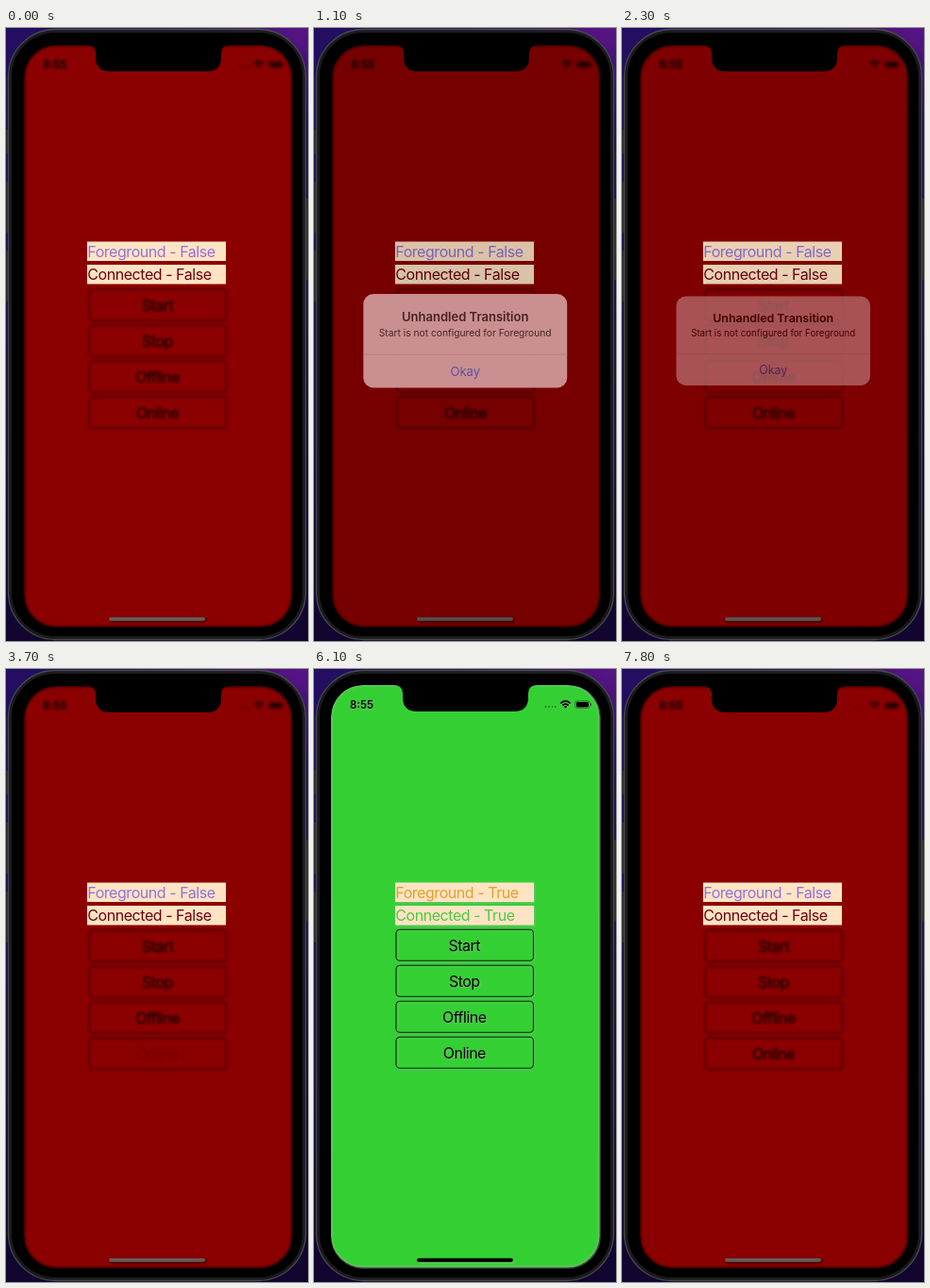
These frames come from a looping animation (320x650 px, 8000 ms). An HTML page:

```html
<!DOCTYPE html>
<html lang="en">
<head>
<meta charset="utf-8">
<title>Connection states</title>
<style>
  html, body { margin: 0; width: 100%; height: 100%; overflow: hidden; background: #12052f; }
  svg { display: block; width: 100vw; height: 100vh; }
  text { font-family: Inter, Roboto, sans-serif; }
  .label { font-size: 16px; letter-spacing: -.45px; }
  .button text { font-size: 16px; letter-spacing: -.5px; text-anchor: middle; }
  .button rect { fill: none; stroke: #000; stroke-width: 1.1; stroke-opacity: .85; }
  .soft text { stroke: #000; stroke-width: .5; }
  .soft .button rect { stroke-width: 2; stroke-opacity: .5; }
  #alert text { text-anchor: middle; }
</style>
</head>
<body>
<svg viewBox="0 0 320 650" preserveAspectRatio="none">
  <defs>
    <linearGradient id="wall" x2="0" y2="1">
      <stop offset="0" stop-color="#240e62"/>
      <stop offset=".4" stop-color="#191050"/>
      <stop offset="1" stop-color="#12052f"/>
    </linearGradient>
    <radialGradient id="bloom" cx="1" cy="0" r=".6">
      <stop offset="0" stop-color="#5a1486"/>
      <stop offset="1" stop-color="#5a1486" stop-opacity="0"/>
    </radialGradient>
    <clipPath id="glass"><rect x="18" y="17" width="286" height="619" rx="34"/></clipPath>
  </defs>

  <rect width="320" height="650" fill="url(#wall)"/>
  <rect width="320" height="160" fill="url(#bloom)"/>

  <g fill="#2c2c31">
    <rect y="108" width="3" height="25"/>
    <rect y="163" width="3" height="54"/>
    <rect y="236" width="3" height="54"/>
    <rect x="317" y="181" width="3" height="86"/>
  </g>
  <rect x="2.5" y="1.5" width="315" height="647" rx="50" fill="#1b1b1d" stroke="#48494d" stroke-width="1.3"/>
  <rect x="6" y="5" width="308" height="640" rx="46" fill="#000"/>

  <g clip-path="url(#glass)">
    <g id="panel">
      <rect id="screen" x="18" y="17" width="284.5" height="617.5" rx="34"/>
      <rect id="edge" x="18" y="17" width="284.5" height="617.5" rx="34" fill="none" stroke-width="2.6" style="filter:blur(1px)"/>
      <path d="M84 15H237V17Q227 17 227 26V30Q227 45 212 45H109Q94 45 94 30V26Q94 17 84 17Z"/>
    </g>

    <g id="status">
      <text x="38" y="41.8" font-size="11.5" font-weight="600">8:55</text>
      <g id="dots" opacity=".4">
        <circle cx="245.5" cy="40" r=".9"/><circle cx="249" cy="40" r=".9"/>
        <circle cx="252.5" cy="40" r=".9"/><circle cx="256" cy="40" r=".9"/>
      </g>
      <path d="M261.3 36.3Q266.5 31.7 271.7 36.3M263.3 38.5Q266.5 35.7 269.7 38.5" fill="none" stroke="#000" stroke-width="1.7"/>
      <path d="M264.7 39.8Q266.5 38.4 268.3 39.8L266.5 41.7Z"/>
      <rect x="276.8" y="33.8" width="15.4" height="7.8" rx="2.3" fill="none" stroke="#000" stroke-opacity=".5" stroke-width=".8"/>
      <rect x="278" y="35" width="13" height="5.4" rx="1.3"/>
      <rect x="292.9" y="36.3" width="1.1" height="2.8" rx=".5" opacity=".5"/>
    </g>

    <g id="labels">
      <g fill="#ffe4c4">
        <rect x="86" y="226.5" width="147" height="20.5"/>
        <rect x="86" y="251" width="147" height="20.5"/>
      </g>
      <text id="fore" class="label" x="86.3" y="242.7"/>
      <text id="conn" class="label" x="86.3" y="267.2"/>
    </g>
    <g id="buttons"></g>
    <rect id="home" x="109" y="624.7" width="102" height="4" rx="2"/>
    <rect id="dim" x="18" y="17" width="286" height="619"/>

    <g id="alert">
      <rect id="backing" x="57.5" y="284.5" width="205.5" height="94.5" rx="10" fill="#740000"/>
      <g id="card">
        <rect x="57.5" y="284.5" width="205.5" height="94.5" rx="10" fill="#e8c0c3"/>
        <path d="M57.5 345.5H263" stroke="#cfa5aa" stroke-width=".8"/>
        <g id="copy">
          <text x="160.2" y="311.8" font-size="12.4" font-weight="600">Unhandled Transition</text>
          <text x="160.2" y="327" font-size="9.75">Start is not configured for Foreground</text>
          <text x="160.2" y="367" font-size="12.4" fill="#2a4fe0">Okay</text>
        </g>
      </g>
    </g>
  </g>
</svg>

<script>
const LOOP = 8000;
const $ = id => document.getElementById(id);
const clamp = x => Math.max(0, Math.min(1, x));
const ease = x => { x = clamp(x); return x * x * (3 - 2 * x); };

// Each state holds from its start time until the next one.
const states = [
  { at: 0, fore: false, conn: false, color: '#8b0000' },
  { at: 3800, fore: false, conn: true, color: '#9370db' },
  { at: 6000, fore: true, conn: true, color: '#34d033' },
  { at: 7100, fore: false, conn: true, color: '#9370db' },
  { at: 7400, fore: false, conn: false, color: '#8b0000' }
];

// Times at which each button is held down: [press, release].
const buttons = [
  { name: 'Start', taps: [[700, 900], [5700, 5980]] },
  { name: 'Stop', taps: [[6700, 7080]] },
  { name: 'Offline', taps: [[7220, 7400]] },
  { name: 'Online', taps: [[3550, 3800]] }
];

const NS = 'http://www.w3.org/2000/svg';
function add(parent, tag, attrs) {
  const el = document.createElementNS(NS, tag);
  for (const key in attrs) el.setAttribute(key, attrs[key]);
  return parent.appendChild(el);
}

buttons.forEach((b, i) => {
  const g = add($('buttons'), 'g', { class: 'button', transform: `translate(0 ${276.3 + 38 * i})` });
  add(g, 'rect', { x: 87, y: 0, width: 145.5, height: 33, rx: 4 });
  b.text = add(g, 'text', { x: 159.3, y: 22.4 });
  b.text.textContent = b.name;
});

function held(taps, t) {
  return Math.max(...taps.map(([down, up]) => clamp((t - down) / 60) * (1 - clamp((t - up) / 90))));
}

// Critically damped spring on entry, plain fade on exit.
function entry(t) {
  const x = Math.max(0, t - 900) * .0133;
  return 1 - (1 + x) * Math.exp(-x);
}

function setLabel(el, name, on, color) {
  el.textContent = `${name} - ${on ? 'True' : 'False'}`;
  el.setAttribute('fill', color);
}

function render(t) {
  const s = states.filter(v => v.at <= t).pop();
  const red = !s.conn;
  const glow = s.fore ? 'drop-shadow(1px 1px 1px rgba(150,185,150,.7))' : 'none';

  $('screen').setAttribute('fill', s.color);
  $('edge').setAttribute('stroke', s.fore ? '#9ab89a' : '#000');
  $('edge').setAttribute('opacity', red ? .7 : s.fore ? .6 : .2);
  $('panel').setAttribute('transform', red ? 'translate(1 1)' : '');
  $('home').setAttribute('fill', red ? '#6a5a5a' : '#000');
  $('home').style.filter = red ? 'drop-shadow(1px 1px 1px #200)' : glow;
  $('labels').style.filter = glow;

  for (const id of ['status', 'buttons']) {
    $(id).setAttribute('class', red ? 'soft' : '');
    $(id).setAttribute('transform', red ? 'translate(1.2 1)' : '');
    $(id).setAttribute('opacity', red ? .7 : 1);
    $(id).style.filter = red ? 'blur(.9px)' : glow;
  }

  setLabel($('fore'), 'Foreground', s.fore, s.fore ? '#e5a029' : '#9370db');
  setLabel($('conn'), 'Connected', s.conn, s.conn ? '#4fc843' : '#6a0010');
  for (const b of buttons) b.text.setAttribute('opacity', 1 - .83 * held(b.taps, t));

  const p = entry(t);
  const shown = p * (1 - ease((t - 2120) / 330));
  const k = 1.2 - .2 * p;
  $('dim').setAttribute('opacity', .2 * shown);
  $('dots').setAttribute('opacity', .4 * (1 - shown));
  $('backing').setAttribute('opacity', clamp(shown * 1.25));
  $('card').setAttribute('opacity', shown);
  $('copy').setAttribute('opacity', p);
  $('alert').setAttribute('transform', `translate(160.2 331.8) scale(${k}) translate(-160.2 -331.8)`);
}

const start = performance.now();
function tick() {
  render((performance.now() - start) % LOOP);
  requestAnimationFrame(tick);
}
tick();
</script>
</body>
</html>
```
